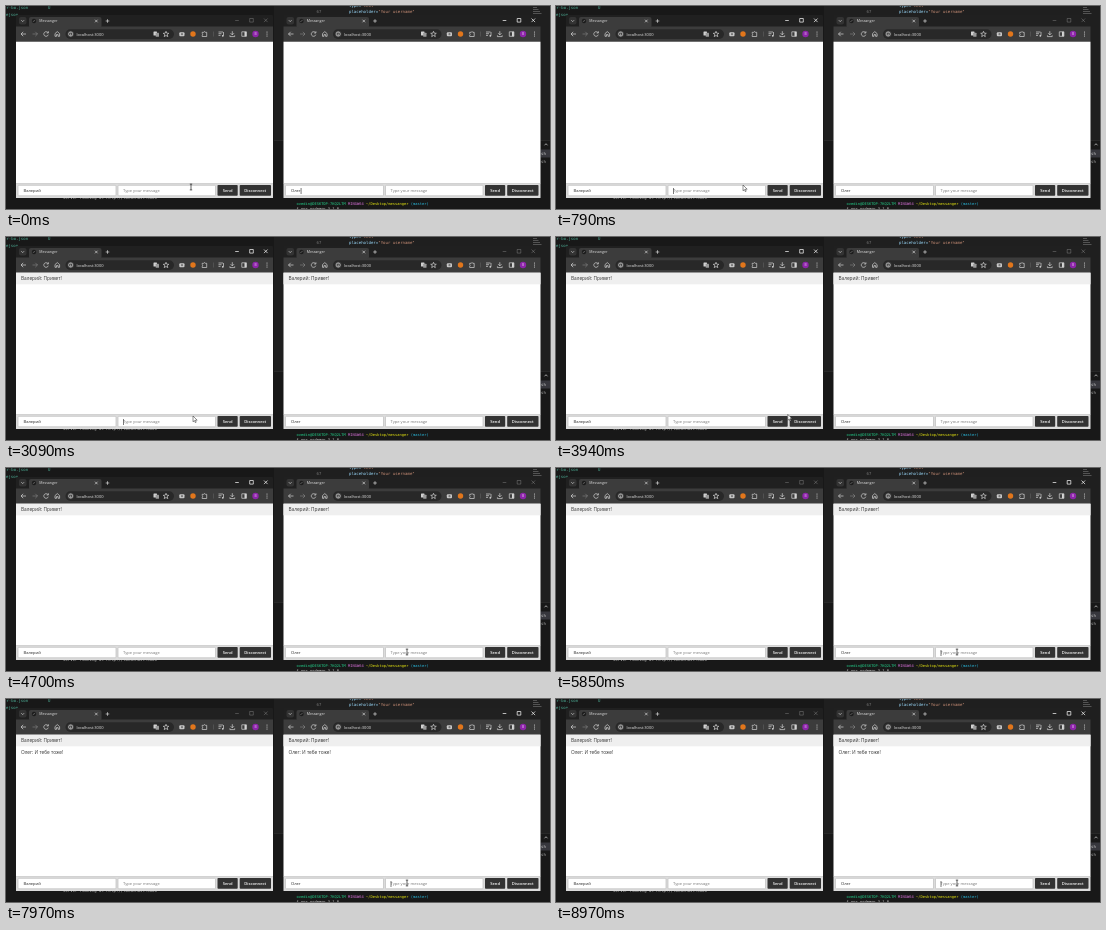
Recreate the animation shown at these times as an HTML page. Size 544x203 px, loop 9 s.

```html
<!DOCTYPE html>
<html lang="ru">
<head>
<meta charset="utf-8">
<title>Messanger</title>
<style>
html, body { margin: 0; width: 100%; height: 100%; overflow: hidden; background: #181818; }
svg { display: block; width: 544px; height: 203px; font-family: "Open Sans", "Noto Sans", sans-serif; }
.mono { font-family: "DejaVu Sans Mono", "Noto Sans Mono", monospace; white-space: pre; }
.line { fill: none; stroke: #d4d4d4; stroke-width: .7; }
.field { fill: #fff; stroke: #bdbdbd; stroke-width: .7; }
</style>
</head>
<body>
<svg id="stage" viewBox="0 0 544 203" xmlns="http://www.w3.org/2000/svg"></svg>
<script>
const LOOP = 9000;
const SHIFT = 267.5;
const NAMES = ['Валерий', 'Олег'];
const TEXTS = ['Привет!', 'И тебе тоже!'];
const SENT = [2500, 7500];
const FOCUS = [300, 4790];
// start and end of each typing burst: [time, letters]
const TYPING = [
  [[790, 0], [1240, 7]],
  [[5850, 0], [6880, 8], [7240, 12]]
];
const CARETS = [
  [[300, 800], [880, 1390], [1910, 2420], [2940, 3450], [3970, 4480]],
  [[4820, 5330], [5850, 6370], [6880, 7430], [7970, 8490], [8970, 9000]]
];
const POINTER = [
  [0, 185, 181], [300, 185, 183], [580, 187, 179], [3850, 187, 179],
  [3940, 231.5, 177.5], [4200, 315, 171], [4500, 390, 180], [4700, 401, 184]
];

const rect = (x, y, w, h, fill, r = 0, extra = '') =>
  `<rect x="${x}" y="${y}" width="${w}" height="${h}" rx="${r}" fill="${fill}" ${extra}/>`;
const dot = (x, y, r, fill) => `<circle cx="${x}" cy="${y}" r="${r}" fill="${fill}"/>`;
const path = (d, extra = '') => `<path class="line" d="${d}" ${extra}/>`;
const text = (x, y, size, fill, str, extra = '') =>
  `<text x="${x}" y="${y}" font-size="${size}" fill="${fill}" ${extra}>${str}</text>`;
const mono = (x, y, size, fill, str) => text(x, y, size, fill, str, 'class="mono"');
const span = (fill, str) => `<tspan fill="${fill}">${str}</tspan>`;

function backdrop() {
  return rect(0, 0, 544, 203, '#181818') +
    rect(268, 0, 276, 134, '#1f1f1f') +
    rect(268, 134, 276, .6, '#333') +
    mono(-2, 3.4, 4, '#4fb39a', 'er-bo.json') +
    mono(42, 3.4, 4, '#4fb39a', 'U') +
    mono(0, 10.4, 4, '#4fb39a', 'ejson') +
    mono(343, .8, 4.06, '#9cdcfe', 'type=' + span('#ce9178', '"text"')) +
    mono(310.5, 6.7, 4, '#777', '67') +
    mono(343, 6.7, 4.06, '#9cdcfe', 'placeholder=' + span('#ce9178', '"Your username"')) +
    [1, 3, 5, 7].map((y, i) => rect(527, y, 4 + i * 1.5, .7, '#6b6b6b')).join('') +
    path('M538.5 139.3l1.5-1.6 1.5 1.6') +
    rect(534, 143.5, 10, 8, '#37373d') +
    mono(535, 148.8, 4, '#ccc', 'sh') +
    mono(535, 157.3, 4, '#aaa', 'sh') +
    mono(57, 193.4, 4, '#bbb', 'Server running at http://localhost:3000') +
    mono(290.5, 198.5, 3.73, '#23d18b',
      'ovedin@DESKTOP-7KQ2LTM ' + span('#d670d6', 'MINGW64 ') +
      span('#e5e510', '~/Desktop/messanger ') + span('#29b8db', '(master)')) +
    mono(290.5, 204.3, 3.73, '#ccc', '$ npx nodemon 3.1.0');
}

function toolbar() {
  return path('M20 28h-5m2.2-2.2L15 28l2.2 2.2') +
    path('M26.500 28h5m-2.200-2.200L31.500 28l-2.200 2.200', 'opacity=".4"') +
    path('M42 26.700a2.300 2.300 0 1 0 .3 2M42.400 25.300v1.700h-1.700') +
    path('M49 30.300v-2.700l2.300-2 2.300 2v2.700h-1.500v-1.700h-1.600v1.700z') +
    rect(59.5, 23.300, 108.500, 9.700, '#282828', 4.8) +
    dot(64.700, 28, 3.3, '#3c3c3c') + path('M64.700 26v.6m0 .9v2.300') +
    `<circle class="line" cx="64.700" cy="28" r="2.100" stroke-width=".5"/>` +
    text(70.5, 29.500, 4, '#e3e3e3', 'localhost:3000') +
    rect(147.500, 25.500, 3.500, 4, '#d0d0d0', .5) + rect(149.700, 26.700, 3.300, 4, '#999', .5) +
    path('M160 25.300l.8 1.900 2 .1-1.600 1.300.6 2-1.800-1.100-1.800 1.100.6-2-1.600-1.300 2-.1z') +
    rect(173.300, 26.200, 5.200, 4, '#c8c8c8', 1) + dot(176, 28.200, 1.100, '#777') +
    dot(187, 28, 2.700, '#e2761b') +
    path('M196.200 26.300h1.500a.9.9 0 0 1 1.700 0h1.300v4.200h-4.500v-1.300a.9.9 0 0 0 0-1.600z') +
    rect(207, 25.500, .5, 5, '#666') +
    path('M212.500 26h4.500m-4.500 1.700h3m-3 1.700h2m3-3.400v3.600') + dot(216.800, 29.800, .9, '#d4d4d4') +
    path('M226.300 25.200v3.600m-1.700-1.600l1.700 1.700 1.700-1.700M223.900 29.300v1.300h4.800v-1.300') +
    path('M235.800 25.800h4.600v4.500h-4.600z') + rect(238.500, 25.800, 1.900, 4.500, '#d4d4d4') +
    dot(249.500, 28, 3.2, '#8e24aa') + text(248.500, 29.300, 3.4, '#e8cdf0', 'В') +
    [26, 28, 30].map(y => dot(261, y, .55, '#d4d4d4')).join('');
}

function browser(i) {
  return `<g transform="translate(${i * SHIFT} 0)">` +
    rect(10, 9, 257, 183, '#202020', 1.2) +
    rect(10, 20.500, 257, 15.200, '#3c3c3c') +
    rect(13, 11, 7.500, 7.500, '#333', 2) + path('M15.300 14.200l1.400 1.400 1.400-1.400') +
    rect(23, 11, 72.500, 11, '#3c3c3c', 2) +
    dot(28, 15, 2.2, '#1c1c1c') + path('M26.800 15.700l2.300-1.400', 'opacity=".5"') +
    text(33.300, 16.400, 3.55, '#e3e3e3', 'Messanger') +
    path('M89 13.700l2.600 2.600m0-2.600l-2.600 2.600M101.500 13.200v3.600m-1.800-1.800h3.600') +
    `<g id="controls${i}">` +
    path('M229.200 14.500h3.600M243.700 12.500h3.600v3.600h-3.600zM258 12.500l3.600 3.600m0-3.600l-3.600 3.600', 'style="stroke:#fff"') +
    '</g>' + toolbar() +
    rect(10, 35.700, 257, 142, '#fff') +
    `<g id="first${i}">` + rect(10, 35.700, 257, 11.600, '#efefef') +
    text(15, 43.300, 4.76, '#333', `${NAMES[0]}: ${TEXTS[0]}`) + '</g>' +
    text(15, 55, 4.76, '#333', `${NAMES[1]}: ${TEXTS[1]}`, `id="second${i}"`) +
    rect(10, 177.300, 257, 14.700, '#dcdcdc') +
    rect(12, 179.300, 98, 10.500, '#fff', .8, 'class="field"') +
    rect(112, 179.300, 97.500, 10.500, '#fff', .8, 'class="field"') +
    text(17.500, 186.100, 4.1, '#222', NAMES[i], `id="name${i}"`) +
    text(117, 186.100, 4.1, '#777', '', `id="entry${i}"`) +
    rect(211.500, 179, 20.200, 10.800, '#333', .8) +
    rect(233.700, 179, 31.300, 10.800, '#333', .8) +
    text(221.600, 186, 4.1, '#fff', 'Send', 'text-anchor="middle" font-weight="600"') +
    text(249.300, 186, 4.1, '#fff', 'Disconnect', 'text-anchor="middle" font-weight="600"') +
    rect(0, 182, .6, 6, '#222', 0, `id="caret${i}"`) + '</g>';
}

const stage = document.getElementById('stage');
stage.innerHTML = backdrop() + browser(0) + browser(1) +
  '<g id="pointer">' +
  '<path id="arrow" d="M0 0v5.800l1.400-1.200.9 2 .9-.4-.9-2h1.900z" fill="#fff" stroke="#222" stroke-width=".5"/>' +
  '<path id="beam" d="M-1.200-2.900h2.400M0-2.900v5.800M-1.200 2.900h2.400" fill="none" stroke="#222" stroke-width=".7"/></g>';
const $ = id => document.getElementById(id);
const show = (id, on) => { $(id).style.display = on ? '' : 'none'; };

// Linear value of a table of [time, ...values] rows
function sample(rows, t) {
  const n = rows.findIndex(row => row[0] > t);
  if (n === 0) return rows[0].slice(1);
  if (n < 0) return rows[rows.length - 1].slice(1);
  const a = rows[n - 1], b = rows[n];
  const k = (t - a[0]) / (b[0] - a[0]);
  return a.slice(1).map((v, j) => v + (b[j + 1] - v) * k);
}

function drawEntry(i, t) {
  const count = t < SENT[i] ? Math.floor(sample(TYPING[i], t)[0] + .001) : 0;
  const entry = $('entry' + i);
  const value = count ? TEXTS[i].slice(0, count) : 'Type your message';
  if (entry.textContent !== value) entry.textContent = value;
  entry.setAttribute('fill', count ? '#222' : '#777');

  const naming = i === 1 && t < FOCUS[0];
  const x = naming ? 17.500 + $('name1').getComputedTextLength()
    : 117 + (count ? entry.getComputedTextLength() : 0);
  $('caret' + i).setAttribute('x', x + .2);
  show('caret' + i, naming || CARETS[i].some(([a, b]) => t >= a && t < b));
}

function drawPointer(t) {
  const [x, y] = sample(POINTER, t);
  const local = x > 272 ? x - SHIFT : x;
  const inField = y >= 179.500 && y <= 190 && local > 12 && local < 209.500;
  $('pointer').setAttribute('transform', `translate(${x} ${y})`);
  show('beam', inField);
  show('arrow', !inField);
}

function draw(now) {
  const t = now % LOOP;
  const active = t >= FOCUS[0] && t < FOCUS[1] ? 0 : 1;
  for (const i of [0, 1]) {
    $('controls' + i).setAttribute('opacity', i === active ? 1 : .3);
    show('first' + i, t >= SENT[0]);
    show('second' + i, t >= SENT[1]);
    drawEntry(i, t);
  }
  drawPointer(t);
}

const start = performance.now();
function tick() {
  draw(performance.now() - start);
  requestAnimationFrame(tick);
}
tick();
</script>
</body>
</html>
```
